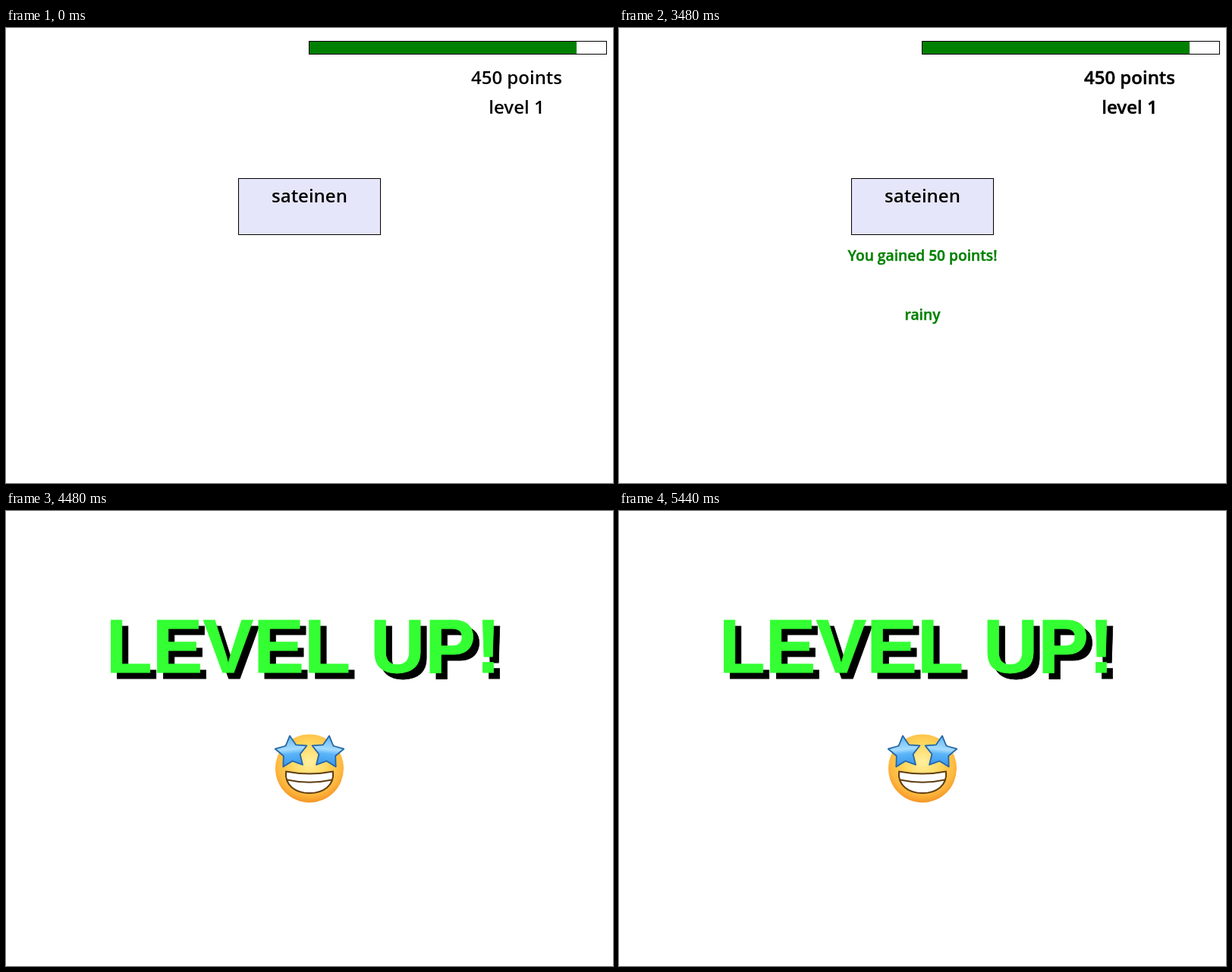
Animation, 800 px wide and 600 px high, one loop 5480 ms. Source, as an HTML page:

```html
<!DOCTYPE html>
<html lang="en">
<head>
<meta charset="utf-8">
<title>Word game</title>
<style>
  html, body { margin: 0; width: 100%; height: 100%; overflow: hidden; background: #fff; }
  svg { display: block; width: 800px; height: 600px; }
  text { text-anchor: middle; font: 600 24px "Open Sans", "Noto Sans", sans-serif; }
  .small { font-size: 19.2px; }
  .big { font: bold 100px "Liberation Sans", Arial, sans-serif; }
  .heavy { stroke-linejoin: round; }
</style>
</head>
<body>
<svg viewBox="0 0 800 600">
  <defs>
    <radialGradient id="skin" cx=".5" cy=".4" r=".62">
      <stop offset="0" stop-color="#fff0a0"/>
      <stop offset=".45" stop-color="#ffd65c"/>
      <stop offset=".8" stop-color="#fdb53c"/>
      <stop offset="1" stop-color="#f28f22"/>
    </radialGradient>
    <linearGradient id="sky" x2="0" y2="1">
      <stop offset="0" stop-color="#5fb4f2"/>
      <stop offset=".45" stop-color="#a5dcff"/>
      <stop offset=".6" stop-color="#5cb5f8"/>
      <stop offset="1" stop-color="#3796ec"/>
    </linearGradient>
  </defs>

  <g id="game">
    <rect x="399.5" y="17.5" width="392" height="17" fill="#fff" stroke="#000"/>
    <rect x="400" y="18" width="352" height="16" fill="#008000"/>
    <text class="heavy" x="673" y="74">450 points</text>
    <text class="heavy" x="673" y="113">level 1</text>
    <rect x="306.5" y="198.5" width="187" height="74" fill="#e6e6fa" stroke="#000"/>
    <text x="400" y="230">sateinen</text>
    <text id="gain" class="small heavy" x="400" y="307" fill="#008000">You gained 50 points!</text>
    <text id="answer" class="small heavy" x="400" y="385"></text>
  </g>

  <g id="levelUp">
    <text class="big" x="400" y="221" stroke="#000" stroke-width=".8">LEVEL UP!</text>
    <text class="big" x="392" y="213" fill="#3f3" stroke="#3f3" stroke-width=".8">LEVEL UP!</text>
    <circle cx="400" cy="339.5" r="45" fill="url(#skin)"/>
    <g fill="url(#sky)" stroke="#2467a8" stroke-width="1.8" stroke-linejoin="round">
      <path class="star" transform="translate(376.3 318.3) rotate(-6)"/>
      <path class="star" transform="translate(423.7 318.3) rotate(6)"/>
    </g>
    <g stroke="#5f3d12" stroke-width="2" stroke-linejoin="round">
      <path d="M369 343.5Q400 349.5 431 343.5C433 362 418 372 400 372S367 362 369 343.5Z" fill="#fff"/>
      <path d="M370.5 354.5Q400 361 429.5 354.5" fill="none"/>
    </g>
  </g>
</svg>
<script>
  const LOOP = 5480, CORRECT = 2280, LEVEL_UP = 3520;
  const typed = [[0, ''], [600, 'r'], [1080, ''], [1400, 'r'], [1520, 'ra'],
                 [1600, 'rai'], [1800, 'rain'], [2040, 'rainy']];
  const el = id => document.getElementById(id);
  const show = (id, on) => el(id).style.display = on ? '' : 'none';
  const heavy = document.querySelectorAll('.heavy');

  const starPoints = Array.from({ length: 10 }, (_, i) => {
    const r = i % 2 ? 11.5 : 22, a = (i / 5 - 0.5) * Math.PI;
    return `${(r * Math.cos(a)).toFixed(2)} ${(r * Math.sin(a)).toFixed(2)}`;
  });
  for (const star of document.querySelectorAll('.star'))
    star.setAttribute('d', `M${starPoints.join('L')}Z`);

  function draw(now) {
    const t = now % LOOP, correct = t >= CORRECT;
    show('game', t < LEVEL_UP);
    show('levelUp', t >= LEVEL_UP);
    show('gain', correct);

    const answer = el('answer');
    answer.textContent = typed.findLast(([start]) => t >= start)[1];
    answer.setAttribute('fill', correct ? '#008000' : '#000');

    // Repeated painting slowly thickens the text edges.
    const weight = correct ? 0.45 * (1 - Math.exp((CORRECT - t) / 250)) : 0;
    for (const text of heavy) {
      text.style.stroke = weight ? text.getAttribute('fill') || '#000' : 'none';
      text.style.strokeWidth = weight;
    }
  }

  const start = performance.now();
  function tick() {
    draw(performance.now() - start);
    requestAnimationFrame(tick);
  }
  tick();
</script>
</body>
</html>
```
